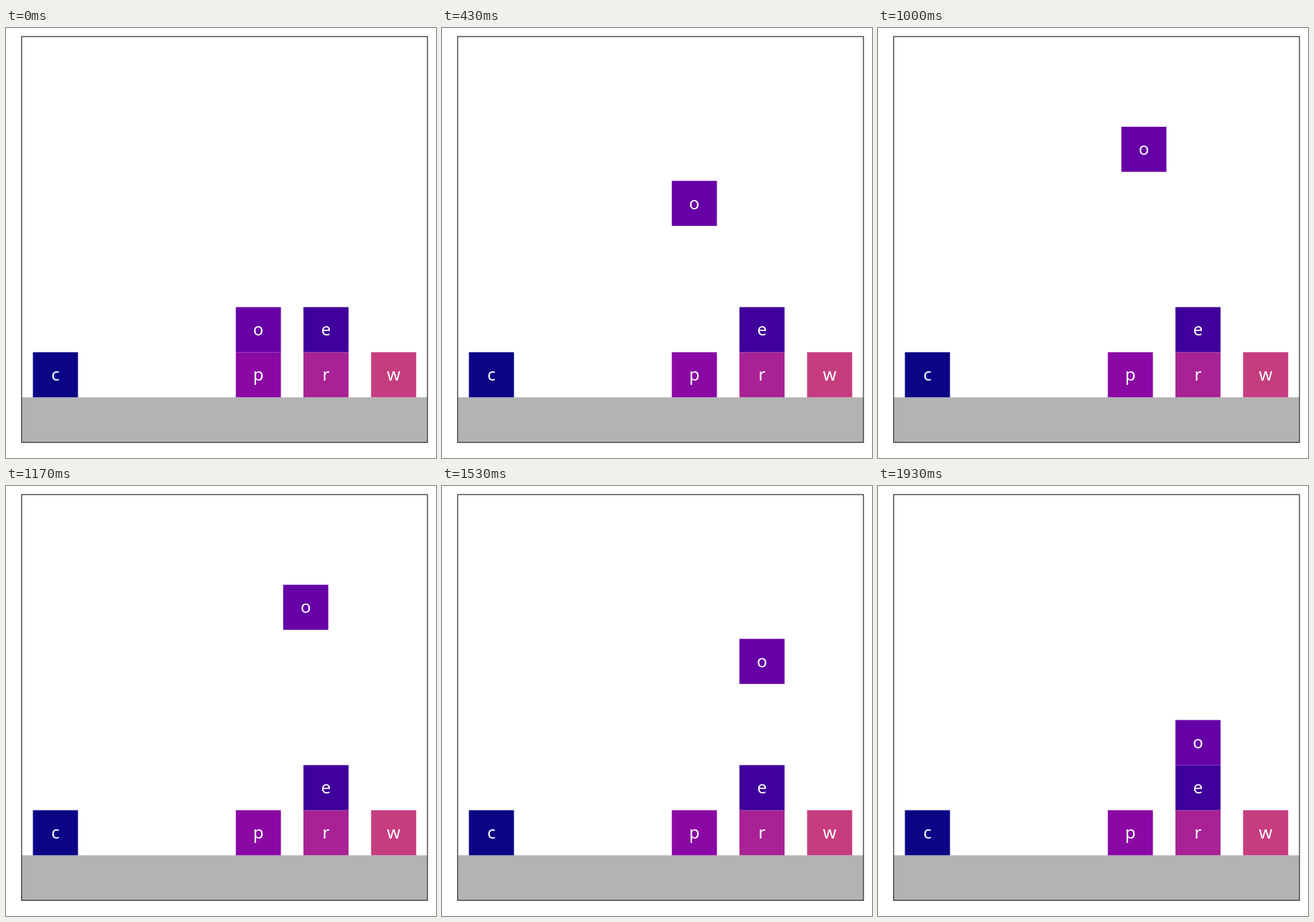
Write an HTML page with a canvas that moves like this. It is 600x600 px and loops after 1960 ms.

```html
<!DOCTYPE html>
<html lang="en">
<head>
<meta charset="utf-8">
<title>Blocks</title>
<style>
  html, body { margin: 0; width: 100%; height: 100%; overflow: hidden; background: #fff; }
  canvas { display: block; }
</style>
</head>
<body>
<canvas id="stage" width="600" height="600"></canvas>
<script>
const ctx = document.getElementById('stage').getContext('2d');
const LOOP = 1960, U = 62.92, LEFT = 21.8, BASE = 515.3, SIZE = 9 * U;

// letter, colour, column, level
const blocks = [
  ['c', '#0b0586', 0, 0],
  ['p', '#8a09a5', 3, 0],
  ['r', '#a92295', 4, 0],
  ['e', '#3f009b', 4, 1],
  ['w', '#c53d7e', 5, 0]
];

// x positions in units: column 0, then columns 3 to 5, 1.5 units apart
const colX = col => 0.25 + 1.5 * col + (col > 0 ? 0 : 0);
const clamp = (v, lo, hi) => Math.min(hi, Math.max(lo, v));

function block(letter, color, col, level) {
  const x = LEFT + colX(col) * U;
  const y = BASE - (level + 1) * U;
  ctx.fillStyle = color;
  ctx.fillRect(x, y, U, U);
  ctx.fillStyle = '#fff';
  ctx.fillText(letter, x + U / 2, y + U / 2 + 8);
}

// Lift four units, pause, slide one column, then lower three units.
function pose(step) {
  const lift = step < 1 ? 0 : clamp((step + 1) / 20, 0, 1);
  const slide = step < 30 ? 0 : clamp((step - 28) / 10, 0, 1);
  const lower = clamp((step - 38) / 20, 0, 1);
  return [3 + slide, 1 + 4 * lift - 3 * lower];
}

function draw(now) {
  // 30 steps per second, on a 10 ms clock
  const tick = Math.floor((now % LOOP) / 10);
  const step = Math.floor(0.3 * tick + 0.15);

  ctx.fillStyle = '#fff';
  ctx.fillRect(0, 0, 600, 600);
  ctx.fillStyle = '#b3b3b3';
  ctx.fillRect(LEFT, BASE, SIZE, U);
  ctx.font = '24px "Noto Sans", "Open Sans", sans-serif';
  ctx.textAlign = 'center';
  for (const b of blocks) block(...b);
  block('o', '#6600a7', ...pose(step));
  ctx.strokeStyle = '#333';
  ctx.lineWidth = 1.25;
  ctx.strokeRect(LEFT, BASE + U - SIZE, SIZE, SIZE);
}

function frame(now) {
  draw(now);
  requestAnimationFrame(frame);
}
draw(0);
requestAnimationFrame(frame);
</script>
</body>
</html>
```
